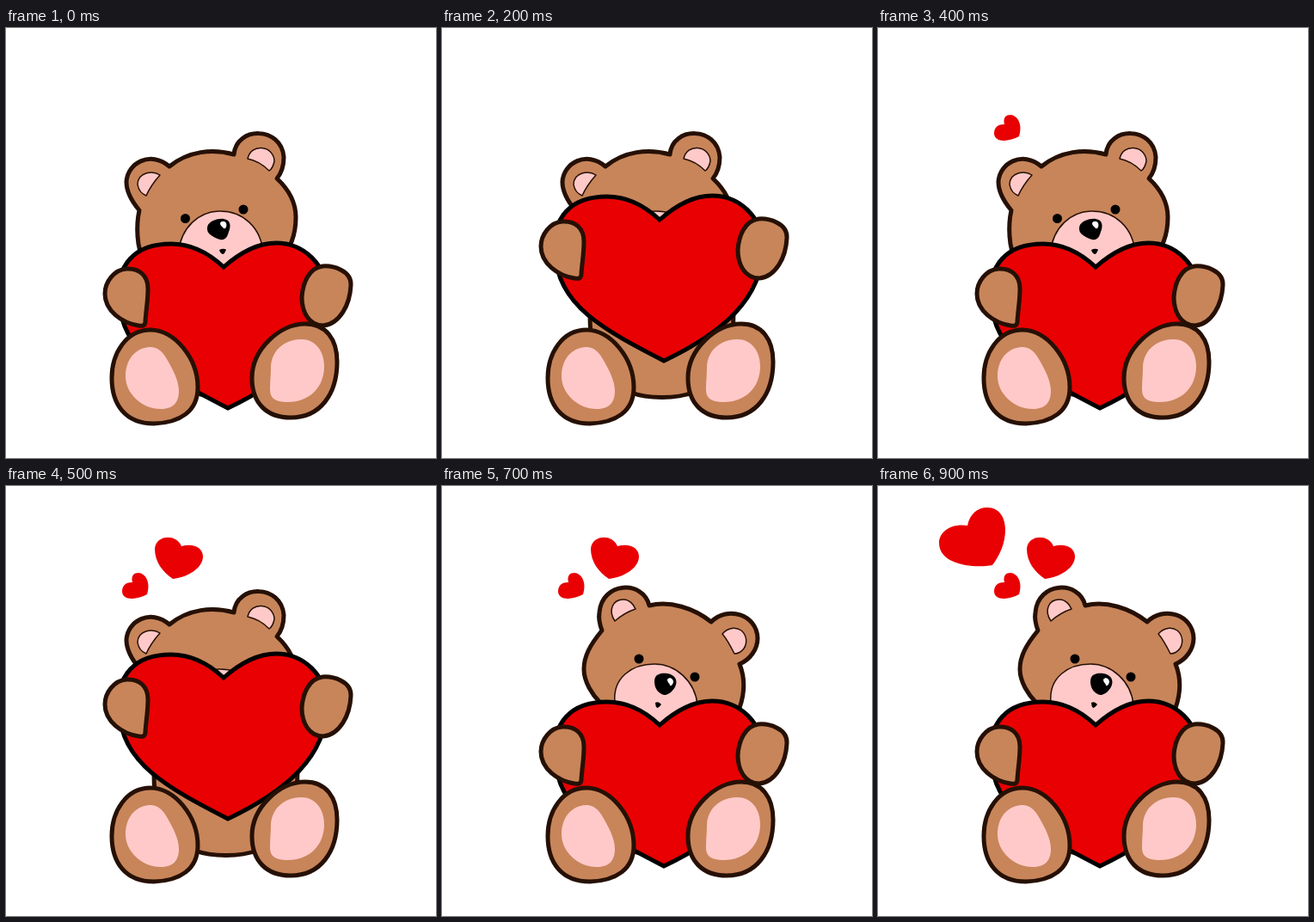
Recreate the animation shown at these times as an HTML page. Size 500 px wide and 500 px high, loop 1000 ms.

```html
<!DOCTYPE html>
<html lang="en">
<head>
<meta charset="utf-8">
<title>Peekaboo bear</title>
<style>
  html, body { margin: 0; width: 100%; height: 100%; overflow: hidden; background: #fff; }
  svg { display: block; width: 100%; height: 100%; }
  .fur { fill: #c8855a; stroke: #261005; stroke-width: 5; stroke-linejoin: round; }
  .pink { fill: #ffc9c9; }
  .line { stroke: #261005; stroke-width: 1.5; stroke-linejoin: round; }
  .red { fill: #e90003; }
  .edge { stroke: #000; stroke-width: 5; }
</style>
</head>
<body>
<svg viewBox="0 0 500 500">
  <path class="fur" d="M172 335C172 400 200 429.500 256 429.500C312 429.500 339 400 339 330Z"/>

  <g id="headLeft">
    <path class="fur" d="M155 212C145 200 140 190 140 179C141 157 168 142 190 161C212 143 240 140 265 147C268 114 320 114 323 150C323 160 320 169 315 175C329 188 337 202 337 220C337 240 330 258 318 270L300 288H185L160 270C152 255 151 230 155 212Z"/>
    <path class="pink line" d="M179 171C170 165 153 168 153 182C154 188 158 193 163 195C167 186 171 180 179 171Z"/>
    <path class="pink line" d="M281 152C283 143 290 139 297 139.500C306 140 312 147 312 155C311 160 309 164 306 166C300 160 291 154 281 152Z"/>
    <path class="pink line" d="M200 262C204 230 225 214 247 213C275 212 297 232 299 262L285 285H215Z"/>
    <circle cx="208.5" cy="221.5" r="5.5"/>
    <circle cx="276" cy="211" r="5.5"/>
    <path d="M234 234C233 225 246 221 253 222C261 223 262 230 259 237C257 245 253 247 249 246C243 244 234 240 234 234Z"/>
    <path fill="#fff" d="M249 227C250 224 255 224 256 227C257 230 256 234 253 233C252 231 249 230 249 227Z"/>
    <path d="M248 258Q252 256 256 257.500Q254 263 252 263Q249 262 248 258Z"/>
  </g>

  <g id="headRight">
    <path class="fur" d="M186 168C183 160 182 153 183 147C186 111 234 109 241 139C265 133 293 142 313 158C332 139 366 149 367 177C367 190 358 202 346 207C352 222 353 238 346 258L320 288H215L184 252C175 243 165 228 165 213C165 198 172 185 186 168Z"/>
    <path class="pink line" d="M201 157C193 145 198 132 211 132C218 132 223 138 225 143C216 146 209 150 201 157Z"/>
    <path class="pink line" d="M326 172C333 164 342 164 348 168C355 174 355 183 351 189C348 193 344 195 340 195C336 187 332 179 326 172Z"/>
    <path class="pink line" d="M201 252C198 222 222 207 247 207C272 207 294 227 297 254L285 285H215Z"/>
    <circle cx="229" cy="201" r="5.5"/>
    <circle cx="294" cy="222" r="5.5"/>
    <path d="M247 227C247 219 254 217 262 218C269 219 274 224 272 231C270 238 263 243 259 243C252 242 247 236 247 227Z"/>
    <path fill="#fff" d="M262 225C264 222 268 223 269 227C269 230 267 233 265 232C265 229 262 229 262 225Z"/>
    <path d="M248 252Q252 250 255 254Q252 258 250 258Q248 256 248 252Z"/>
  </g>

  <g id="hold">
    <path class="red edge" d="M253 223C235 206 215 196 192 196C150 196 127 220 132 262C133 322 190 352 258 387C325 355 373 315 373 255C373 220 346 195 314 195C290 195 270 208 253 223Z"/>
    <path class="fur" d="M140 225C155 224 165 233 165 248C165 263 163 271 162 286C162 291 159 292 154 291C135 288 115 274 115 254C115 240 126 226 140 225Z"/>
    <path class="fur" d="M368 222C380 221 402 227 401 244C400 267 388 289 369 291C352 291 344 275 344 258C345 242 352 224 368 222Z"/>
  </g>

  <path class="fur" d="M168 351C196 351 223 384 223 418C223 446 202 459 172 460C139 460 123 438 123 407C123 378 140 351 168 351Z"/>
  <path class="pink" d="M168 371C176 371 182 376 187 385C194 397 201 410 201 422C201 437 193 443 180 443C158 443 139 425 139 405C139 388 148 372 168 371Z"/>
  <path class="fur" d="M348 344C372 344 385 362 385 388C385 425 366 453 331 453C303 453 286 436 286 407C286 374 318 344 348 344Z"/>
  <path class="pink" d="M342 362C358 361 370 374 370 393C370 417 354 435 327 435C313 435 307 430 307 421C307 410 308 404 308 394C309 374 324 363 342 362Z"/>

  <path id="small" class="red" d="M164 126C153 132 136 134 135 123C135 115 140 112 147 112C145 104 149 101 154 101C164 102 168 114 164 126Z"/>
  <path id="medium" class="red" d="M194 108C182 100 173 88 173 73C174 57 198 55 204 70C217 66 229 71 229 82C229 95 212 106 194 108Z"/>
  <path id="large" class="red" d="M133 92C112 96 71 92 71 66C71 52 87 43 104 46C107 32 116 25 127 25C142 25 148 38 148 51C148 66 142 80 133 92Z"/>
</svg>
<script>
  const STEP = 100;
  // L and R: head tilt with the heart lowered; H: hiding behind it
  const POSES = "LRHRLHLRHR";
  const APPEAR = { small: 3, medium: 5, large: 8 };

  const el = id => document.getElementById(id);
  const show = (id, on) => el(id).setAttribute("visibility", on ? "visible" : "hidden");

  function draw(ms) {
    const step = Math.floor(ms / STEP) % POSES.length;
    const pose = POSES[step];
    show("headLeft", pose !== "R");
    show("headRight", pose === "R");
    el("hold").setAttribute("transform", `translate(0 ${pose === "H" ? 0 : 55})`);
    for (const id in APPEAR) show(id, step >= APPEAR[id]);
  }

  let start = null;
  function tick(now) {
    if (start === null) start = now;
    draw(now - start);
    requestAnimationFrame(tick);
  }
  draw(0);
  requestAnimationFrame(tick);
</script>
</body>
</html>
```
